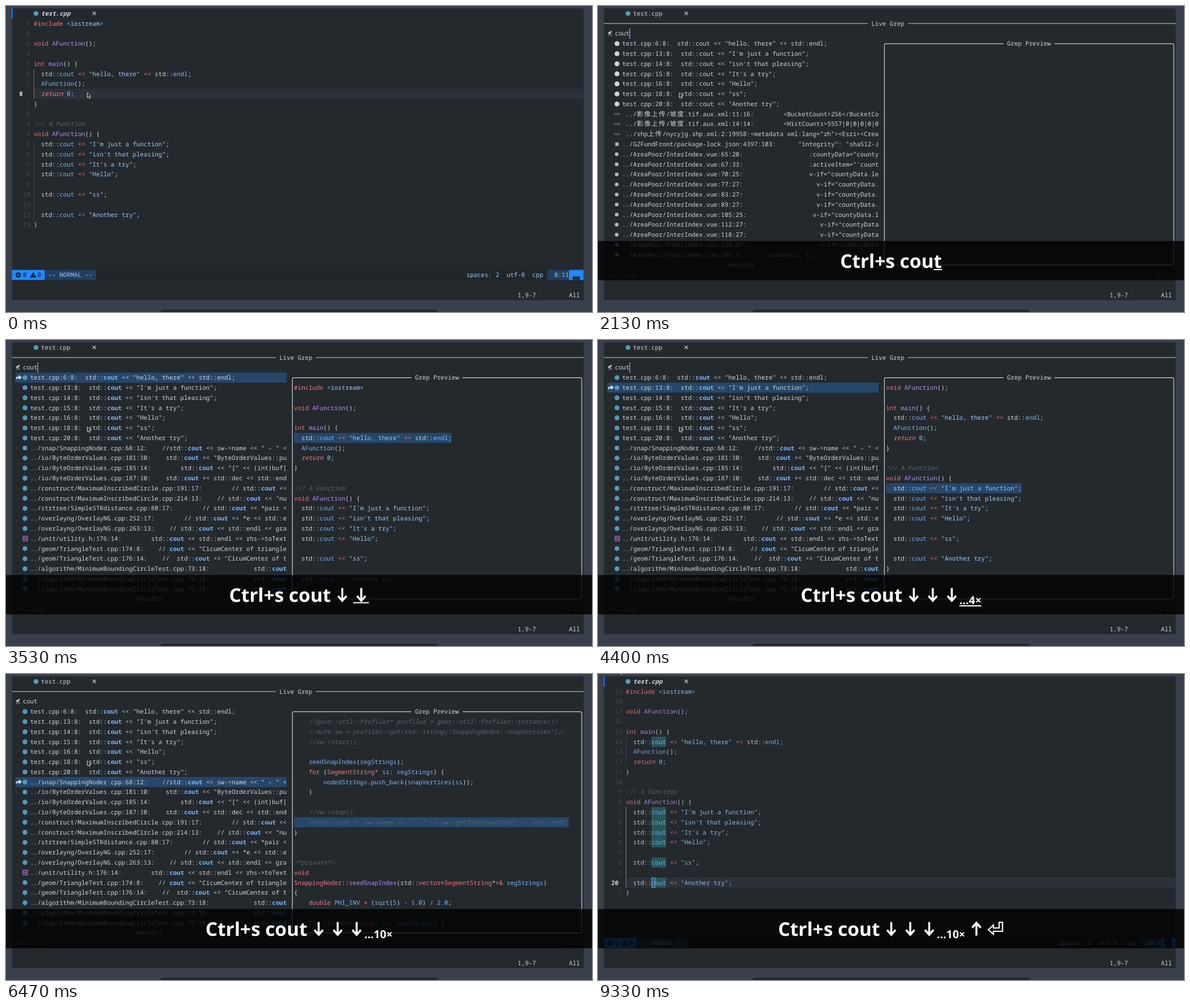
Animation, 1034 px wide and 541 px high, one loop 9.47 s. Source, as an HTML page:

```html
<!DOCTYPE html>
<html lang="en">
<head>
<meta charset="utf-8">
<title>Live grep in a code editor</title>
<style>
  html, body { margin: 0; width: 100%; height: 100%; overflow: hidden; background: #3a3f4c; }
  svg { display: block; width: 1034px; height: 541px; }
  text {
    font: 10.78px "Noto Sans Mono", "DejaVu Sans Mono", monospace;
    white-space: pre;
    text-rendering: geometricPrecision;
    font-variant-ligatures: none;
  }
  .b { font-weight: 700; }
  .i { font-style: italic; }
  .cjk { font-family: "Noto Sans CJK SC", "Noto Sans CJK", sans-serif; font-size: 11.5px; }
  .tiny { font-size: 6.5px; font-weight: 700; }
  .key { font: 700 33.4px "Open Sans", "Noto Sans", sans-serif; }
  .sub { font: 700 19.4px "Open Sans", "Noto Sans", sans-serif; }
</style>
</head>
<body>
<svg viewBox="0 0 1034 541">
  <rect width="1034" height="541" fill="#3a3f4c"/>
  <rect x="273" y="537" width="489" height="8" rx="3" fill="#24272e"/>
  <rect x="10.3" y="4.3" width="1009" height="515.6" fill="#24292e"/>
  <g id="scene"></g>
  <g id="banner"></g>
  <path id="mouse" d="M0 0V8.6L2 6.8L3.6 10L5 9.3L3.5 6.2H6.2Z" fill="#111" stroke="#f4f4f4" stroke-width=".9"/>
</svg>
<script>
const LOOP = 9470, CW = 6.467, RH = 17.78;
const FG = '#d1d5da', RED = '#f97583', PURPLE = '#b392f0', BLUE = '#79b8ff', STR = '#9ecbff',
      GREY = '#5c656f', DIM = '#444d56', ACCENT = '#2188ff', NAVY = '#213f5f', PICK = '#264769', BG = '#24292e';

const main = `#include <iostream>

void AFunction();

int main() {
  std::cout << "hello, there" << std::endl;
  AFunction();
  return 0;
}

/// A Function
void AFunction() {
  std::cout << "I'm just a function";
  std::cout << "isn't that pleasing";
  std::cout << "It's a try";
  std::cout << "Hello";

  std::cout << "ss";

  std::cout << "Another try";
}`.split('\n');

const snap = `    //geos::util::Profiler* profiler = geos::util::Profiler::instance();
    //auto sw = profiler->get(std::string("SnappingNoder::snapVertices"));
    //sw->start();

    seedSnapIndex(segStrings);
    for (SegmentString* ss: segStrings) {
        nodedStrings.push_back(snapVertices(ss));
    }

    //sw->stop();
    //std::cout << sw->name << " - " << sw->getTotFormatted() << std::endl;
}


/*private*/
void
SnappingNoder::seedSnapIndex(std::vector<SegmentString*>& segStrings)
{
    double PHI_INV = (sqrt(5) - 1.0) / 2.0;

    for (SegmentString* ss: segStrings) {`.split('\n');

const hits = [6, 13, 14, 15, 16, 18, 20];
const own = hits.map(n => ['cpp', `test.cpp:${n}:8:  ${main[n - 1].trim()}`]);

// Each entry: icon, path, text that ends at the right edge of the list
const spread = rows => rows.map(([icon, path, text]) => [icon, path, text]);
const vue = (pos, text) => ['vue', `../AreaPoor/InterIndex.vue:${pos}:`, text];
const early = [...own, ...spread([
  ['xml', ' ../影像上传/坡度.tif.aux.xml:11:16:', '<BucketCount>256</BucketCo'],
  ['xml', ' ../影像上传/坡度.tif.aux.xml:14:14:', '<HistCounts>5557|0|0|0|0|0'],
  ['xml', ' ../shp上传/nycyjg.shp.xml:2:19958:', '<metadata xml:lang="zh"><Esri><Crea'],
  ['npm', '../GZFundFront/package-lock.json:4397:103:', '"integrity": "sha512-J'],
  vue('65:20', ':countyData="county'),
  vue('67:33', `:activeItem="'count`),
  vue('70:25', 'v-if="countyData.le'),
  vue('77:27', 'v-if="countyData.'),
  vue('83:27', 'v-if="countyData.'),
  vue('89:27', 'v-if="countyData.'),
  vue('105:25', 'v-if="countyData.l'),
  vue('112:27', 'v-if="countyData'),
  vue('118:27', 'v-if="countyData'),
  vue('124:27', 'v-if="countyData'),
  vue('299:7', 'countyOri: [],'.padEnd(31))
])];
const full = [...own, ...spread([
  ['cpp', '../snap/SnappingNoder.cpp:68:12:', '//std::cout << sw->name << " - " <'],
  ['cpp', '../io/ByteOrderValues.cpp:181:10:', 'std::cout << "ByteOrderValues::pu'],
  ['cpp', '../io/ByteOrderValues.cpp:185:14:', 'std::cout << "[" << (int)buf['],
  ['cpp', '../io/ByteOrderValues.cpp:187:10:', 'std::cout << std::dec << std::end'],
  ['cpp', '../construct/MaximumInscribedCircle.cpp:191:17:', '// std::cout <<'],
  ['cpp', '../construct/MaximumInscribedCircle.cpp:214:13:', '// std::cout << "nu'],
  ['cpp', '../strtree/SimpleSTRdistance.cpp:80:17:', '// std::cout << *pair <'],
  ['cpp', '../overlayng/OverlayNG.cpp:252:17:', '// std::cout << *e << std::e'],
  ['cpp', '../overlayng/OverlayNG.cpp:263:13:', '// std::cout << std::endl << gra'],
  ['h', '../unit/utility.h:176:14:', 'std::cout << std::endl << rhs->toText'],
  ['cpp', '../geom/TriangleTest.cpp:174:8:', '// cout << "CicumCenter of triangle'],
  ['cpp', '../geom/TriangleTest.cpp:176:14:', '//  std::cout << "CicumCenter of t'],
  ...[73, 74, 75].map(n => ['cpp', `../algorithm/MinimumBoundingCircleTest.cpp:${n}:18:`, 'std::cout'])
])];

// Every step overrides part of the state that came before it
const steps = [
  [0, { view: 'edit', line: 8, col: 11, ruler: '1,9-7', keys: '', downs: 0, row: -1, show: -1, list: [], typed: '' }],
  [130, { cursor: 1 }],
  [330, { keys: 'Ctrl+s', mark: 1 }],
  [400, { view: 'grep', ruler: '1,5-3' }],
  [530, { mark: 0 }],
  [800, { typed: 'c', keys: 'Ctrl+s c', ruler: '1,6-4', mark: 1 }],
  [1000, { mark: 0 }],
  [1400, { cursor: 0 }],
  [2130, { typed: 'cout', keys: 'Ctrl+s cout', ruler: '1,9-7', mark: 1, cursor: 1, list: early }],
  [2330, { mark: 0, list: full }],
  [2730, { downs: 1, mark: 1, cursor: 0, row: 0, color: 1 }],
  [2930, { mark: 0 }],
  [3200, { show: 0 }],
  [3470, { downs: 2, mark: 1, cursor: 1 }],
  [3730, { mark: 0, row: -1, show: -1 }],
  [4070, { downs: 3, mark: 1, row: 1 }],
  [4130, { show: 1 }],
  [4330, { downs: 4 }],
  [4530, { downs: 5, row: 2, show: 2 }],
  [4870, { mark: 0 }],
  [5130, { downs: 6, mark: 1, row: 3, show: 3 }],
  [5330, { downs: 7, row: 4, show: 4 }],
  [5470, { downs: 8, row: 5, show: 5 }],
  [5730, { downs: 9, row: 6, show: 6 }],
  [5930, { downs: 10, row: 7, show: 7 }],
  [6130, { mark: 0 }],
  [6470, { cursor: 0 }],
  [7070, { up: 1, mark: 1, cursor: 1, row: 6, show: 6 }],
  [7330, { mark: 0 }],
  [7730, { cursor: 0 }],
  [7870, { view: 'edit', line: 20, col: 8, enter: 1, mark: 1, cursor: 1 }],
  [8070, { marks: 1 }],
  [8200, { mark: 0 }],
  [8470, { cursor: 0 }],
  [8800, { cursor: 2 }]
];
let last = {};
const states = steps.map(([at, change]) => last = { ...last, ...change, at });

const X = col => 10.3 + col * CW;
const Y = row => 13.2 + row * RH;
const esc = s => s.replace(/&/g, '&amp;').replace(/</g, '&lt;');
const text = (col, row, s, fill = FG, cls = '') =>
  `<text x="${X(col).toFixed(2)}" y="${(Y(row) + 3.7).toFixed(2)}" fill="${fill}" class="${cls}">${esc(s)}</text>`;
const box = (x, y, w, h, fill, more = '') => `<rect x="${x}" y="${y}" width="${w}" height="${h}" fill="${fill}" ${more}/>`;
const cells = (col, row, n, fill) => box(X(col), Y(row) - RH / 2, n * CW, RH, fill);
const line = (d, stroke = FG, w = 1.2) => `<path d="${d}" fill="none" stroke="${stroke}" stroke-width="${w}"/>`;

const TOKEN = /(\/\*.*\*\/|\/\/.*)|("[^"]*"|<iostream>)|(#include|\b(?:void|int|for|double|SegmentString|SnappingNoder|vector)\b|<<|[-=\/*&](?!>))|(\breturn\b)|(\bstd\b)|((?<=void |int |Noder::)[A-Za-z]\w*)|(\d[\d.]*|[A-Za-z_]\w*)|\s+|./g;
const LOOK = [[GREY, 'i'], [STR], [RED], [RED, 'i'], [FG], [PURPLE], [BLUE]];
function code(col, row, s) {
  let out = '';
  for (const m of s.matchAll(TOKEN)) {
    const kind = m.slice(1).findIndex(Boolean);
    if (m[0].trim()) out += text(col + m.index, row, m[0], ...(LOOK[kind] || [FG]));
  }
  return out;
}

// Plain text on the grid; wide characters take two cells, matches may be bold
function plain(col, row, s, bold) {
  let out = '';
  for (const part of s.split(/([\u3000-\u9fff]|cout)/)) {
    const wide = /[\u3000-\u9fff]/.test(part);
    const hit = bold && part === 'cout';
    if (part.trim()) out += text(col, row, part, hit ? BLUE : FG, wide ? 'cjk' : hit ? 'b' : '');
    col += wide ? 2 : part.length;
  }
  return out;
}
const width = s => s.length + (s.match(/[\u3000-\u9fff]/g) || []).length;

const dot = (x, y, fill) => `<circle cx="${x}" cy="${y}" r="4.3" fill="${fill}"/>`;
function icon(kind, row, tinted) {
  const x = 33.5, y = Y(row);
  if (kind === 'cpp') return dot(x, y, tinted ? '#519aba' : FG);
  if (kind === 'vue') return `<circle cx="33" cy="${y}" r="3.3" fill="#b4b8bd"/>`;
  if (kind === 'npm') return box(30.5, y - 3, 6, 6, '#b4b8bd');
  if (kind === 'xml') return `<text x="28" y="${y + 2.2}" class="tiny" fill="#b4b8bd">&lt;/></text>`;
  return box(30, y - 4, 8, 8, 'none', 'rx="1" stroke="#a074c4" stroke-width="1.4"') +
    line(`M32.4 ${y - 2.3}v4.6M35.6 ${y - 2.3}v4.6M32.4 ${y}h3.2`, '#a074c4');
}

function tab(active) {
  return (active ? box(10.3, 4.3, 1.6, RH, ACCENT) : '') + dot(53, 13.2, '#519aba') +
    text(8, 0, 'test.cpp', FG, active ? 'b i' : '') + line('M152.8 10.2l5.8 5.8m0-5.8l-5.8 5.8', FG, 1.1);
}
const ruler = s => text(138, 28, s) + text(152, 28, 'All');

function status(s) {
  const pos = `${s.line}:${s.col}`, y = Y(26), top = y - RH / 2;
  const fill = s.line === 8 ? 11.5 : 0;
  return cells(0, 26, 156, '#20262a') + cells(0, 26, 9, ACCENT) + cells(9, 26, 14, NAVY) + cells(146, 26, 6, NAVY) +
    cells(152, 26, 4, ACCENT) + box(X(153), top + fill, 2 * CW, RH - fill, '#20303f') +
    `<circle cx="21.5" cy="${y}" r="4.6" fill="#14202c"/>` + line(`M19.7 ${y - 1.8}l3.6 3.6m0-3.6l-3.6 3.6`, ACCENT, 1.3) +
    `<path d="M48 ${y - 5}l5.6 9.6h-11.2z" fill="#14202c"/>` + line(`M48 ${y - 1.6}v3m0 1v1.2`, ACCENT, 1.2) +
    text(3, 26, '0', '#14202c') + text(7, 26, '0', '#14202c') + text(10, 26, '-- NORMAL --', STR) +
    text(124, 26, 'spaces: 2', STR) + text(135, 26, 'utf-8', STR) + text(142, 26, 'cpp', STR) +
    text(152 - pos.length, 26, pos, STR);
}

function editor(s) {
  const guide = (a, b, on) => line(`M49.4 ${Y(a) - RH / 2}V${Y(b) + RH / 2}`, on || '#3a4149', 1);
  const top = s.line === 8;
  let out = cells(6, s.line, 150, '#2c313a');
  if (s.marks) for (const n of hits) out += cells(13, n, 4, '#28575d');
  out += guide(6, 8, top && '#9a626b') + guide(13, 20, !top && '#7a8189') + '<g id="code">';
  main.forEach((src, i) => {
    const n = i + 1, now = n === s.line;
    const label = String(now ? n : Math.abs(n - s.line));
    out += now ? text(2, n, label, '#e1e4e8', 'b') : text(5 - label.length, n, label, DIM);
    out += code(6, n, src);
  });
  out += '</g>';
  const col = 5 + s.col;
  if (s.cursor === 1) out += cells(col, s.line, 1, '#c8e1ff') + text(col, s.line, main[s.line - 1][s.col - 1], BG);
  if (s.cursor === 2) out += box(X(col) + .5, Y(s.line) - 8.4, CW - 1, RH - 1, 'none', `stroke="${BLUE}" stroke-width="1"`);
  return tab(true) + out + status(s) + ruler(s.ruler);
}

function preview(show) {
  if (show < 0) return '';
  const foreign = show === 7, n = hits[show];
  const first = foreign ? 0 : Math.max(0, n - 11);
  const src = (foreign ? snap : main).slice(first, first + 21);
  const at = foreign ? 10 : n - 1 - first;
  return cells(77, 4 + at, src[at].length, PICK) + src.map((l, i) => code(77, 4 + i, l)).join('');
}

function grep(s) {
  const top = Y(3), end = Y(25);
  let out = tab(false) + line(`M10.3 ${Y(1)}H${X(72)}M${X(83)} ${Y(1)}H1019.3`) + text(73, 1, 'Live Grep');
  // Telescope
  out += line('M18 48.5L24 45', FG, 2.6) + line('M21.5 48L18.5 53M21.5 48L24 53', FG, 1) + text(3, 2, s.typed);
  if (s.cursor) out += box(X(3 + s.typed.length) - .2, Y(2) - RH / 2, 1.3, RH, '#79b8ff');
  s.list.forEach(([kind, path, tail], i) => {
    const row = i + 3;
    if (i === s.row) {
      const y = Y(row);
      out += cells(1, row, 74, PICK) +
        `<path d="M17.3 ${y + 4.5}C17 ${y - 1} 19 ${y - 2} 23 ${y - 2}V${y - 4.8}L28 ${y - .3}L23 ${y + 4}V${y + 1.2}C20 ${y + 1} 18.5 ${y + 2} 17.3 ${y + 4.5}Z" fill="${FG}"/>`;
    }
    out += icon(kind, row, s.list === full) + plain(5, row, path, s.color);
    if (tail) out += plain(75 - width(tail), row, tail, s.color);
  });
  out += text(34, 25, 'Results');
  out += line(`M${X(109)} ${top}H508.5Q505.3 ${top} 505.3 ${top + 3}V${end - 3}Q505.3 ${end} 508.5 ${end}H1013Q1016 ${end} 1016 ${end - 3}V${top + 3}Q1016 ${top} 1013 ${top}H${X(123)}`);
  out += text(110, 3, 'Grep Preview') + preview(s.show);
  return out + text(1, 26, 'test.cpp', '#6a737d') + text(151, 26, '8:11', '#6a737d') + ruler(s.ruler);
}

const pen = document.createElement('canvas').getContext('2d');
function measure(s, size) {
  pen.font = `700 ${size}px "Open Sans", "Noto Sans", sans-serif`;
  return pen.measureText(s).width;
}

function keyBanner(s) {
  if (!s.keys) return '';
  const GAP = 5.5, ARROW = 28;
  let x = 0, out = '', under;
  const put = (w, draw, y = 463.5) => { out += draw(x); under = [x, y, w]; x += w; };
  const label = (str, cls, size, y, uy) =>
    put(measure(str, size), at => `<text x="${at}" y="${y}" class="${cls}" fill="#fff">${str}</text>`, uy);
  const arrow = up => {
    x += GAP;
    const tip = up ? 440 : 461, tail = up ? 462.5 : 438.5, wing = up ? 448.5 : 452.5;
    put(ARROW, at => {
      const c = at + ARROW / 2 + .5;
      return line(`M${c} ${tail}V${tip}M${c - 7.5} ${wing}L${c} ${tip}L${c + 7.5} ${wing}`, '#fff', 3.5);
    });
  };
  label(s.keys, 'key', 33.4, 462.5);
  if (s.keys.length > 6) {
    const w = measure(s.keys.slice(-1), 33.4);
    under = [x - w, 465, w];
  }
  for (let i = 0; i < Math.min(s.downs, 3); i++) arrow(false);
  if (s.downs > 3) label(`...${s.downs}×`, 'sub', 19.4, 467, 469);
  if (s.up) arrow(true);
  if (s.enter) {
    x += GAP;
    put(29.5, at => line(`M${at + 2} 452l9-8v5h10v-10h6v16h-16v5z`, '#fff', 2.2));
  }
  if (s.mark) out += box(under[0], under[1], under[2], 2, '#fff');
  return box(0, 415.5, 1034, 69.5, '#000', 'fill-opacity=".81"') + `<g transform="translate(${517 - x / 2} 0)">${out}</g>`;
}

const scene = document.getElementById('scene');
const banner = document.getElementById('banner');
const mouse = document.getElementById('mouse');
const clamp = v => Math.max(0, Math.min(1, v));
let shown;

function frame(now) {
  const t = now % LOOP;
  const s = states.findLast(v => v.at <= t);
  if (s !== shown) {
    scene.innerHTML = s.view === 'edit' ? editor(s) : grep(s);
    banner.innerHTML = keyBanner(s);
    shown = s;
  }
  const body = document.getElementById('code');
  if (body) body.setAttribute('opacity', 1 - .13 * clamp((t - 8730) / 250));
  const k = clamp((t - 8730) / 600), u = k * k * (3 - 2 * k), v = 1 - u;
  const mx = v * v * 143.5 - 2 * u * v * 30 + u * u * 37;
  const my = v * v * 153.5 + 2 * u * v * 60 - u * u * 9;
  mouse.setAttribute('transform', `translate(${mx} ${my})`);
  requestAnimationFrame(() => frame(performance.now()));
}
frame(0);
</script>
</body>
</html>
```
